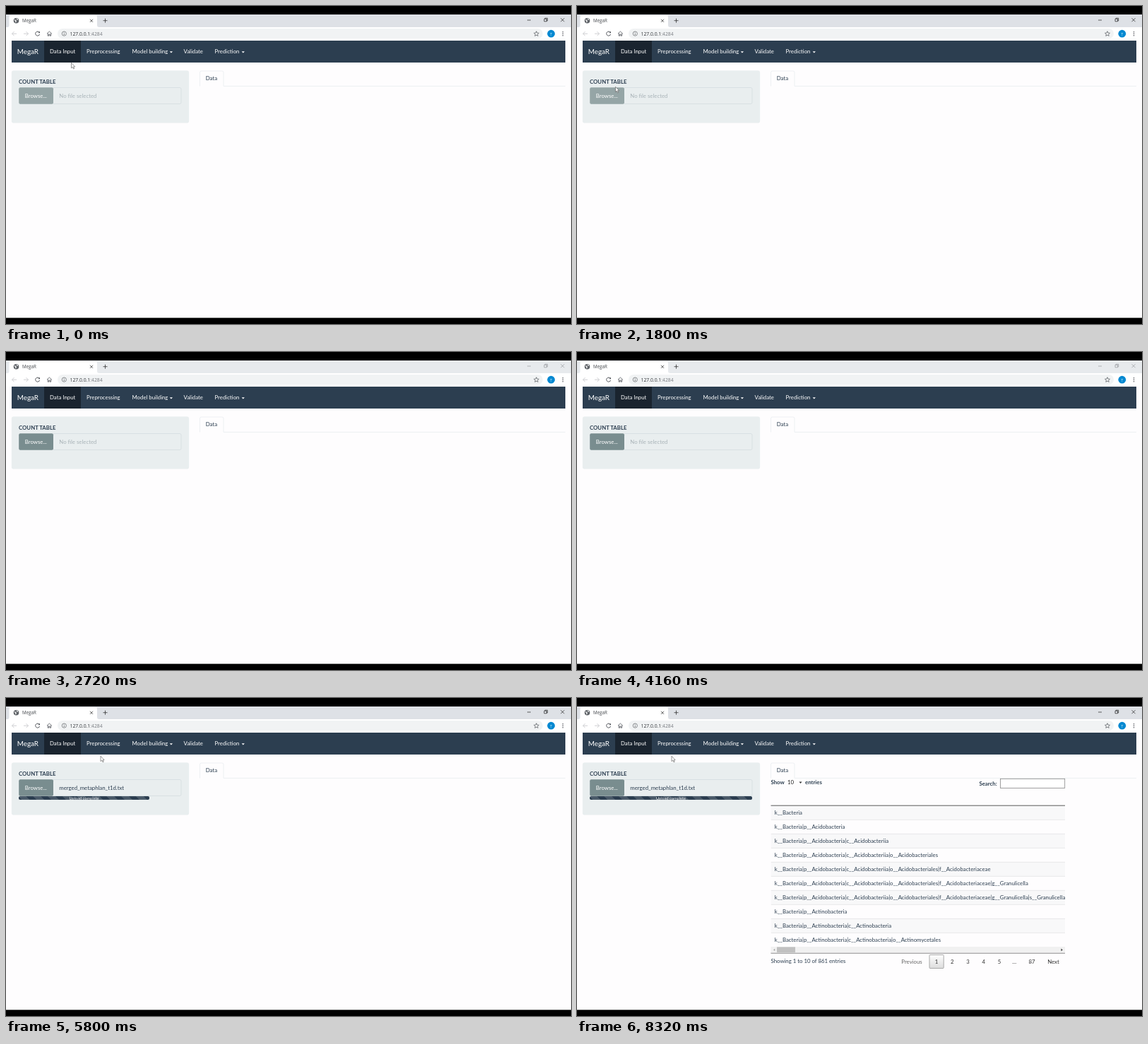
Write an HTML page that moves like this. It is 800x450 px and loops after 8360 ms.

```html
<!DOCTYPE html>
<html lang="en">
<head>
<meta charset="utf-8">
<title>MegaR</title>
<style>
  html, body { margin: 0; width: 100%; height: 100%; overflow: hidden; background: #fefdfe; }
  svg { position: absolute; left: 0; top: 0; }
  text { font-family: Lato, sans-serif; font-size: 7.8px; fill: #2c3e50; white-space: pre; }
  .ui { font-family: "Open Sans", sans-serif; }
  .bold { font-weight: 700; }
  #bar {
    position: absolute; left: 18px; top: 138.5px; height: 5.5px; border-radius: 2px;
    background: linear-gradient(45deg, #ffffff26 25%, #0000 25% 50%, #ffffff26 50% 75%, #0000 75%) 0 0 / 20.8px 20.8px #2c3e50;
    font: 5.65px/5.5px Lato, sans-serif; color: #fff; text-align: center; white-space: nowrap;
  }
</style>
</head>
<body>
<svg id="stage" width="800" height="450" viewBox="0 0 800 450"></svg>
<div id="bar">Upload complete</div>
<svg width="800" height="450" viewBox="0 0 800 450">
  <path id="arrow" d="M0 0V7.4L1.8 5.8L3 8.5L4.2 8L3 5.4H5.2Z" fill="#fff" stroke="#555" stroke-width=".6"/>
  <path id="hand" d="M-.7 .3Q0-.5 .6 .3V3L3.6 3.7Q4.3 4 4.2 4.9L3.6 8H-.3L-2.3 5Q-2-.1-.7 5Z" fill="#fff" stroke="#333" stroke-width=".5"/>
</svg>
<script>
const LOOP = 8360;
const stage = document.getElementById('stage');
const byId = id => document.getElementById(id);

function add(parent, tag, attrs, content) {
  const node = document.createElementNS('http://www.w3.org/2000/svg', tag);
  for (const key in attrs) node.setAttribute(key, attrs[key]);
  if (content) node.textContent = content;
  parent.append(node);
  return node;
}
const group = (attrs = {}) => add(stage, 'g', attrs);
const rect = (parent, x, y, width, height, fill, more) =>
  add(parent, 'rect', { x, y, width, height, fill, ...more });
const path = (parent, d, stroke, more) =>
  add(parent, 'path', { d, stroke, fill: 'none', 'stroke-width': 0.8, ...more });
// y is the visual middle of the line
const label = (parent, x, y, content, style = '', more) =>
  add(parent, 'text', { x, y: y + 2.7, style, ...more }, content);

// Browser window
const page = group();
const titleBar = rect(page, 0, 12, 800, 18, '#dee1e6');
path(page, 'M2 30Q4.5 30 4.5 27V16Q4.5 12.8 8 12.8H126Q129 12.8 129 16V27Q129 30 132 30Z', 'none', { fill: '#fff' });
add(page, 'circle', { cx: 14.5, cy: 20.7, r: 3.8, fill: '#5f6368' });
path(page, 'M12 19.5L14.2 21L13.5 23M15 18L16.8 19.5', '#fff', { 'stroke-width': 1.2 });
label(page, 23, 20.6, 'MegaR', 'font-size:6.2px;fill:#45494d', { class: 'ui' });
path(page, 'M119 18.8L123 22.8M123 18.8L119 22.8', '#333');
path(page, 'M137.5 20.7H143.5M140.5 17.7V23.7', '#333');
const controls = path(page, 'M738 20H743M762 18.3H765.5V21.8H762ZM763 18V17.2H766.7V21H765.7M785.5 17.2L790.5 22.2M790.5 17.2L785.5 22.2', '#222', { 'stroke-width': 0.7 });

rect(page, 0, 30, 800, 18.5, '#fff');
rect(page, 73, 32, 687, 14, '#f1f3f4', { rx: 7 });
path(page, 'M15 39.2H8.5M11.5 36.2L8.5 39.2L11.5 42.2M25 39.2H31.5M28.5 36.2L31.5 39.2L28.5 42.2', '#c3c5c8');
path(page, 'M47.2 37.4A3 3 0 1 0 47.6 40', '#50545a', { 'stroke-width': 1 });
path(page, 'M48 35.8V38.3H45.5Z', 'none', { fill: '#50545a' });
path(page, 'M58 39.2L61.4 36L64.8 39.2M59.2 38.5V42.2H60.7V40H62.1V42.2H63.6V38.5', '#50545a');
path(page, 'M82.3 38.7V41M82.3 36.9V37.7', '#5f6368');
add(page, 'circle', { cx: 82.3, cy: 39.1, r: 3.1, fill: 'none', stroke: '#5f6368', 'stroke-width': 0.7 });
const url = label(page, 90.5, 39.3, '127.0.0.1', 'font-size:6.8px;fill:#303438', { class: 'ui' });
add(url, 'tspan', { fill: '#777b80' }, ':4284');
path(page, 'M751 35.7L752 38.1L754.5 38.3L752.6 40L753.2 42.4L751 41.1L748.8 42.4L749.4 40L747.5 38.3L750 38.1Z', '#50545a', { 'stroke-width': 0.7 });
add(page, 'circle', { cx: 771.8, cy: 39.2, r: 5.4, fill: '#0288d1' });
label(page, 771.8, 39.2, 'T', 'font-size:5px;fill:#fff', { class: 'ui', 'text-anchor': 'middle' });
for (const cy of [36.7, 39.2, 41.7]) add(page, 'circle', { cx: 788.5, cy, r: 0.8, fill: '#50545a' });

// Navigation
rect(page, 8, 49, 784, 31, '#2c3e50');
rect(page, 54, 49, 52, 31, '#1a242f');
label(page, 15.7, 64.2, 'MegaR', 'font-size:9.9px;fill:#fff', { dy: 0.7 });
for (const [x, name] of [[62, 'Data Input'], [114, 'Preprocessing'], [178.5, 'Model building'], [251.5, 'Validate'], [295.5, 'Prediction']])
  label(page, x, 64.7, name, 'fill:#fff');
for (const x of [231.8, 333.7]) path(page, `M${x} 64.3h4.2l-2.1 2.2Z`, 'none', { fill: '#fff' });

// Upload panel
rect(page, 8.3, 91.7, 250.4, 73.5, '#e9eeef', { rx: 2, stroke: '#e3e9ea', 'stroke-width': 0.5 });
label(page, 18, 107.2, 'COUNT TABLE', '', { class: 'bold' });
rect(page, 66, 115.5, 182, 23, '#e9eeef', { rx: 2, stroke: '#d6dfe3', 'stroke-width': 0.9 });
const button = rect(page, 18.2, 115.3, 48.8, 23.4, '#95a5a6', { rx: 2 });
label(page, 26.8, 127, 'Browse...', 'fill:#fff');
const fileName = label(page, 75.3, 127, ' ');

// Data tab
path(page, 'M274.5 113.4V94Q274.5 92 276.5 92H306Q308 92 308 94V113.4H792', '#e6ebee', { 'stroke-width': 0.7 });
label(page, 282.7, 102.6, 'Data');

// Table
const table = group();
const bold = { class: 'bold' };
label(table, 274.5, 119.5, 'Show', '', bold);
label(table, 298, 119.5, '10', 'fill:#222');
path(table, 'M314.5 118.5h4l-2 2.4Z', 'none', { fill: '#333' });
label(table, 323, 119.5, 'entries', '', bold);
label(table, 569.4, 121, 'Search:', '', bold);
rect(table, 599.5, 114.3, 91.2, 13.2, '#fff', { stroke: '#888', 'stroke-width': 0.8 });

const clip = add(table, 'clipPath', { id: 'tableClip' });
rect(clip, 274.5, 150, 416.5, 212);
const rows = add(table, 'g', { 'clip-path': 'url(#tableClip)' });
const acido = 'k__Bacteria|p__Acidobacteria';
const acidoOrder = acido + '|c__Acidobacteriia|o__Acidobacteriales';
const genus = acidoOrder + '|f__Acidobacteriaceae|g__Granulicella';
const actino = 'k__Bacteria|p__Actinobacteria';
[
  'k__Bacteria', acido, acido + '|c__Acidobacteriia', acidoOrder,
  acidoOrder + '|f__Acidobacteriaceae', genus, genus + '|s__Granulicella_unclassified',
  actino, actino + '|c__Actinobacteria', actino + '|c__Actinobacteria|o__Actinomycetales'
].forEach((name, i) => {
  const y = 152.3 + 20 * i;
  if (i % 2 === 0) rect(rows, 274.5, y, 416.5, 20, '#f8f8f9');
  if (i) path(rows, `M274.5 ${y}H691`, '#d8d8da', { 'stroke-width': 0.6 });
  label(rows, 279.8, y + 10.1, name);
});
path(table, 'M274.5 152.2H691M274.5 361H691', '#333');
rect(table, 274.5, 352, 416.5, 8.6, '#f1f1f1');
rect(table, 283, 352.4, 26, 7.8, '#c1c1c1');
path(table, 'M280.2 354.7v3.4l-2-1.7Z', 'none', { fill: '#999' });
path(table, 'M685.5 354.6v3.6l2.2-1.8Z', 'none', { fill: '#333' });
label(table, 274.5, 372.7, 'Showing 1 to 10 of 861 entries');

const gradient = add(table, 'linearGradient', { id: 'current', x2: 0, y2: 1 });
add(gradient, 'stop', { offset: 0, 'stop-color': '#fff' });
add(gradient, 'stop', { offset: 1, 'stop-color': '#dcdcdc' });
rect(table, 499, 363.5, 20.2, 19, 'url(#current)', { rx: 1, stroke: '#979797', 'stroke-width': 0.8 });
for (const [x, name] of [[474, 'Previous'], [509, '1'], [531.3, '2'], [553.6, '3'], [575.8, '4'], [598, '5'], [619.3, '…'], [644, '87'], [674.5, 'Next']])
  label(table, x, 373, name, `fill:${name === 'Previous' ? '#666' : '#333'}`, { 'text-anchor': 'middle' });

rect(page, 0, 0, 800, 12, '#000');
rect(page, 0, 441.3, 800, 9, '#000');

// Motion: [time, x, y]
const track = [
  [0, 92.5, 80.5], [40, 92.5, 80.5], [280, 86, 66], [1500, 86, 66], [1800, 54.5, 114.3], [2000, 52, 127],
  [5040, 150, 145], [5360, 134, 82.3], [LOOP, 134, 82.3]
];
const buttonSteps = [[0, '#95a5a6'], [1840, '#798d8f'], [2440, '#5f7475'], [2680, '#798d8f']];
const smooth = p => p * p * (3 - 2 * p);
const clamp = p => Math.min(1, Math.max(0, p));

function cursorAt(t) {
  const i = track.findIndex(([time]) => time > t);
  const [t0, x0, y0] = track[i - 1], [t1, x1, y1] = track[i];
  if (t0 === 2000) return [x0, y0];
  const p = smooth((t - t0) / (t1 - t0));
  return [x0 + (x1 - x0) * p, y0 + (y1 - y0) * p];
}
const show = (node, on) => { node.style.display = on ? '' : 'none'; };

function render(t) {
  const away = t >= 2560 && t < 5040;
  const pointing = t >= 1840 && t < 2560;
  const [x, y] = cursorAt(t);
  for (const id of ['arrow', 'hand']) byId(id).setAttribute('transform', `translate(${x} ${y})`);
  show(byId('arrow'), !away && !pointing);
  show(byId('hand'), pointing);

  titleBar.setAttribute('fill', away ? '#e7eaed' : '#dee1e6');
  controls.setAttribute('stroke', away ? '#95989c' : '#222');
  button.setAttribute('fill', buttonSteps.findLast(([time]) => time <= t)[1]);

  const chosen = t >= 5160;
  fileName.textContent = chosen ? 'merged_metaphlan_t1d.txt' : 'No file selected';
  fileName.style.fill = chosen ? '#2c3e50' : '#a9b3b8';

  const bar = byId('bar');
  show(bar, t >= 5360);
  bar.style.width = 230 * smooth(clamp((t - 5400) / 560)) + 'px';
  show(table, t >= 5880);
}

const start = performance.now();
function frame() {
  render((performance.now() - start) % LOOP);
  requestAnimationFrame(frame);
}
render(0);
requestAnimationFrame(frame);
</script>
</body>
</html>
```
